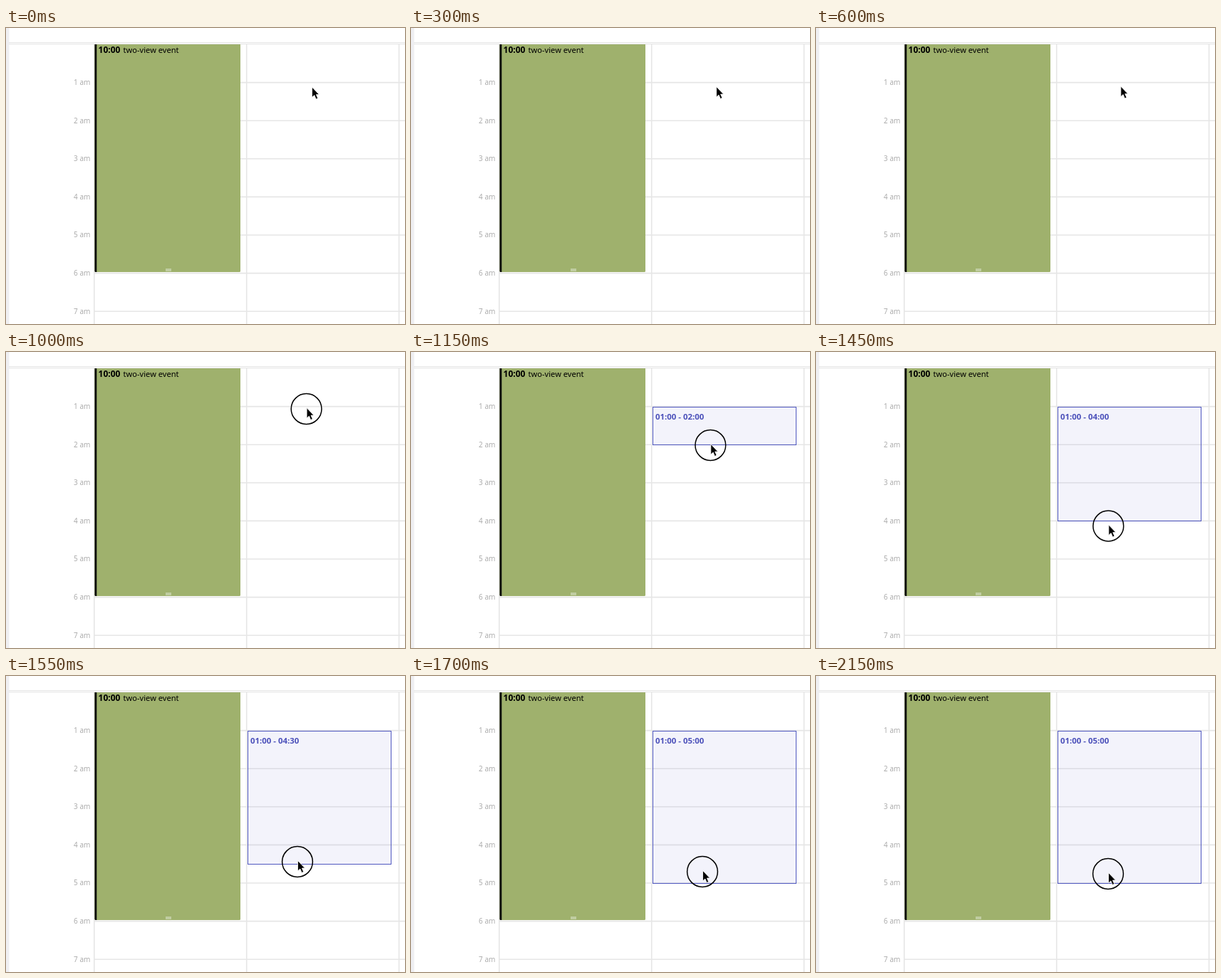
These frames come from a looping animation (560x416 px, 2950 ms). An HTML page:

```html
<!DOCTYPE html>
<html lang="en">
<head>
<meta charset="utf-8">
<title>Calendar drag selection</title>
<style>
  html, body { margin: 0; width: 100%; height: 100%; overflow: hidden; background: #fff; }
  svg { display: block; width: 560px; height: 416px; }
  text { font-family: "Noto Sans", "Open Sans", sans-serif; }
  .hour { font-size: 10px; fill: #acacac; text-anchor: end; }
  .bold { font-weight: 700; }
</style>
</head>
<body>
<svg viewBox="0 0 560 416">
  <rect width="4.5" height="416" fill="#efeff2"/>
  <path d="M4 20.5H560M4 22.5H560" stroke="#e4e4e4"/>
  <g id="grid" stroke="#e6e6e6" stroke-width="1.6"></g>
  <g id="hours"></g>

  <path d="M124.5 23H329V341.5Q329 343 327.5 343H126Q124.5 343 124.5 341.5Z" fill="#9fb16d"/>
  <path d="M124.5 23H127.3V343H126Q124.5 343 124.5 341.5Z" fill="#080808"/>
  <path d="M224 339H232M224 341H232" stroke="#ccd6b2" stroke-width="1.4"/>
  <text class="bold" x="129.6" y="34.5" font-size="12">10:00</text>
  <text x="164.6" y="34.5" font-size="11.1">two-view event</text>

  <g id="selection">
    <rect id="range" x="339.5" y="77.5" width="201" fill="#515cc0" fill-opacity=".07" stroke="#5058c0"/>
    <text class="bold" id="label" x="343" y="95" font-size="11.4" fill="#4b50ba"></text>
  </g>

  <g id="pointer">
    <circle id="ring" r="21.4" fill="none" stroke="#000" stroke-width="1.5"/>
    <path d="M.5 -1.5V13L3.8 10L6.1 15.4L8.7 14.3L6.4 9.1H10.5Z" fill="#000" stroke="#fff" stroke-width=".8"/>
  </g>
</svg>
<script>
const LOOP = 2950, STEP = 50, TOP = 23, HOUR = 53.6;
const RING_AT = 900, DRAG_AT = 1100, LAG = 50;
const $ = id => document.getElementById(id);
const hourY = h => TOP + h * HOUR;

// time, x, y of the pointer
const path = [
  [0, 429, 84.5], [600, 427.3, 83.5], [800, 423.5, 81], [1000, 421.6, 80],
  [1050, 421.4, 85], [1100, 421, 104], [1150, 420.3, 131], [1200, 419.3, 159],
  [1250, 418, 183.5], [1350, 414, 219], [1450, 410.3, 244.5],
  [1550, 409, 261], [1700, 409, 275], [1900, 409.5, 277.3], [2150, 410, 278]
];

function pointerAt(t) {
  const i = path.findIndex(p => p[0] > t);
  if (i < 0) return path[path.length - 1].slice(1);
  const [a, b] = [path[i - 1], path[i]];
  const k = (t - a[0]) / (b[0] - a[0]);
  return [1, 2].map(n => a[n] + (b[n] - a[n]) * k);
}

function clock(h) {
  const pad = n => String(n).padStart(2, "0");
  return pad(Math.floor(h)) + ":" + pad(h % 1 * 60);
}

// The selection ends on the next half hour below the pointer.
function endHour(t) {
  const h = (pointerAt(t - LAG)[1] - TOP) / HOUR;
  return Math.floor(h * 2) / 2 + 0.5;
}

function buildGrid() {
  let lines = "M123.8 22V416M337.7 22V416M551.6 22V416", labels = "";
  for (let h = 1; h <= 7; h++) {
    const y = hourY(h);
    lines += `M123 ${y}H560`;
    labels += `<text class="hour" x="118.4" y="${y + 3.4}">${h} am</text>`;
  }
  $("grid").innerHTML = `<path d="${lines}"/>`;
  $("hours").innerHTML = labels;
}

function render(ms) {
  const t = Math.floor(ms % LOOP / STEP) * STEP;
  const [x, y] = pointerAt(t);
  $("pointer").setAttribute("transform", `translate(${x} ${y})`);
  $("ring").style.display = t >= RING_AT ? "" : "none";
  $("selection").style.display = t >= DRAG_AT ? "" : "none";
  if (t >= DRAG_AT) {
    const end = endHour(t);
    $("range").setAttribute("height", Math.round(hourY(end)) - 77);
    $("label").textContent = `01:00 - ${clock(end)}`;
  }
}

buildGrid();
const start = performance.now();
function tick() {
  render(performance.now() - start);
  requestAnimationFrame(tick);
}
tick();
</script>
</body>
</html>
```
